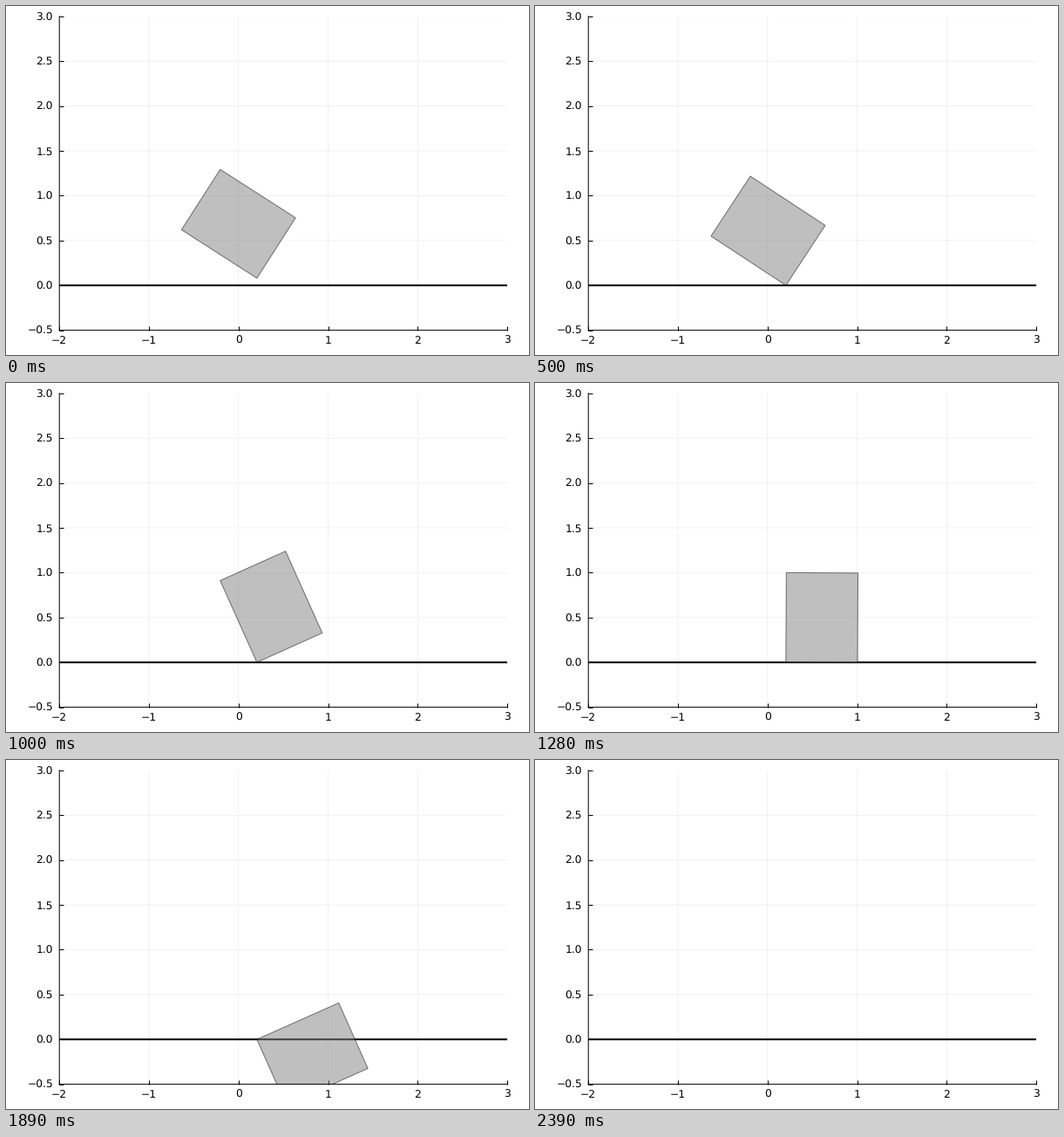
A matplotlib script for the animation above (3.99 s loop, 600 by 400 pixels).

```python
import numpy as np
import matplotlib.pyplot as plt
from matplotlib.animation import FuncAnimation
from matplotlib.patches import Polygon

W, H, DPI = 600, 400, 100
UNIT = 102.8
LEFT, BOTTOM = 61.2, 371.61
PX = 72 / DPI
LOOP_MS, TICK_MS, FPS = 3990, 10, 18

# The simulation skips a step at these ticks, so the box stands still.
HOLDS = np.array([4, 22, 24, 27, 31, 33, 37, 40])
CONTACT, RELEASE, GONE = 7.7, 28, 35
PIVOT = np.array([0.2045, 0.0])
DROP = 0.08
GRAVITY = 0.0026
FLIGHT_SPEED = np.array([-0.045, -0.143])
CORNERS = np.array([[0, 0], [0.8, 0], [0.8, 1], [0, 1]])
MIDDLE = np.array([0.4, 0.5])
TURN_STEPS = [CONTACT, 8, 9, 12, 17, 19, 24, 26, 28, 33, 36]
TURN_ANGLES = [57.3, 56.7, 54.2, 45.5, 24.2, 11.3, -17.6, -44.5, -66, -135, -176.4]

plt.rcParams.update({"font.family": "DejaVu Sans", "text.hinting": "none",
                     "path.snap": False})
fig = plt.figure(figsize=(W / DPI, H / DPI), dpi=DPI, facecolor="white")
ax = fig.add_axes([LEFT / W, 1 - BOTTOM / H, 5 * UNIT / W, 3.5 * UNIT / H])
ax.set(xlim=(-2, 3), ylim=(-0.5, 3))
ax.set_xticks(range(-2, 4))
ax.set_yticks(np.arange(-0.5, 3.1, 0.5))
ax.yaxis.set_major_formatter("{x:.1f}")
ax.tick_params(direction="in", length=4.72 * PX, width=PX, labelsize=12.2 * PX)
ax.tick_params(axis="x", pad=6.2 * PX)
ax.tick_params(axis="y", pad=7.2 * PX)
ax.set_axisbelow(True)
ax.grid(color="black", alpha=0.1, linewidth=0.5 * PX)
for side in ("top", "right"):
    ax.spines[side].set_visible(False)
for side in ("left", "bottom"):
    ax.spines[side].set_linewidth(PX)

ax.plot([-2, 3], [0, 0], color="black", linewidth=2 * PX,
        solid_capstyle="butt", zorder=2)
box = Polygon(CORNERS, closed=True, facecolor=(0.5, 0.5, 0.5, 0.5),
              edgecolor=(0, 0, 0, 0.5), linewidth=PX, joinstyle="miter", zorder=2.3)
ax.add_patch(box)


def rotation(degrees):
    a = np.radians(degrees)
    return np.array([[np.cos(a), -np.sin(a)], [np.sin(a), np.cos(a)]])


def box_corners(step):
    """Fall onto one corner, tip over it, then drop freely."""
    turn = rotation(np.interp(step, TURN_STEPS, TURN_ANGLES))
    corner = PIVOT.copy()
    if step < CONTACT:
        corner[1] = DROP * (1 - (step / CONTACT) ** 2)
    elif step > RELEASE:
        s = step - RELEASE
        start = PIVOT + rotation(np.interp(RELEASE, TURN_STEPS, TURN_ANGLES)) @ MIDDLE
        centre = start + FLIGHT_SPEED * s - np.array([0, GRAVITY * s * s / 2])
        corner = centre - turn @ MIDDLE
    return corner + CORNERS @ turn.T


def update(i):
    tick = int((i * TICK_MS + 5) * FPS / 1000)
    step = tick - np.count_nonzero(HOLDS <= tick)
    box.set_visible(step < GONE)
    box.set_xy(box_corners(min(step, GONE)))
    return (box,)


anim = FuncAnimation(fig, update, frames=LOOP_MS // TICK_MS, interval=TICK_MS,
                     repeat=True, repeat_delay=0)
plt.show()
```
